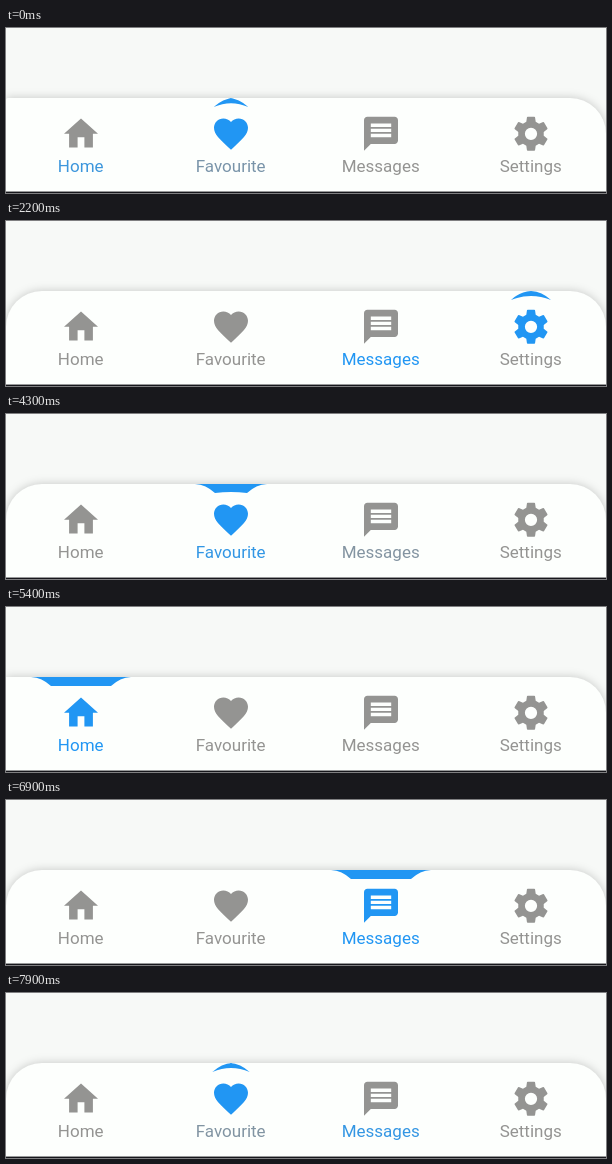
An HTML page that plays this animation: 600x165 px, repeating every 8000 ms.

```html
<!DOCTYPE html>
<html lang="en">
<head>
<meta charset="utf-8">
<title>Bottom navigation</title>
<style>
  html, body { margin: 0; width: 100%; height: 100%; overflow: hidden; background: #f7f9f7; }
  svg { display: block; width: 600px; height: 165px; }
  text { font: 400 17px Roboto, sans-serif; text-anchor: middle; }
  #bar { fill: #fdfffd; filter: drop-shadow(0 0 5px rgba(0, 0, 0, .2)); }
  #notch { fill: #2196f3; }
</style>
</head>
<body>
<svg viewBox="0 0 600 165">
  <path id="bar"/>
  <path id="notch"/>
  <g id="tabs"></g>
  <rect y="163.6" width="600" height="1.4" fill="#17171c"/>
</svg>
<script>
const LOOP = 8000, STEP = 100, DURATION = 480;
const TOP = 70, RADIUS = 36, HALF = 50, SIDE = 20, DEPTH = 9;
const GREY = [148, 148, 146], BLUE = [33, 150, 243];

// [start time, selected tab]
const TAPS = [[-20, 1], [600, 2], [2200, 3], [3100, 2], [4000, 1], [4900, 0],
              [5700, 1], [6300, 2], [7100, 3], [7500, 2], [7890, 1]];

// Icons use a 24 unit box
const TABS = [
  ['Home', 'M10 20v-6h4v6h5v-8h3L12 3 2 12h3v8z'],
  ['Favourite', 'M12 21.35l-1.45-1.32C5.4 15.36 2 12.28 2 8.5 2 5.42 4.42 3 7.5 3c1.74 0 3.41.81 4.5 2.09C13.09 3.81 14.76 3 16.5 3 19.58 3 22 5.42 22 8.5c0 3.78-3.4 6.86-8.55 11.54z'],
  ['Messages', 'M20 2H4c-1.1 0-2 .9-2 2v18l4-4h14c1.1 0 2-.9 2-2V4c0-1.1-.9-2-2-2zM18 14H6v-2h12zM18 11H6V9h12zM18 8H6V6h12z'],
  ['Settings', gear()]
];

function gear() {
  let d = '';
  for (let i = 0; i < 6; i++) {
    const a = i * Math.PI / 3, c = Math.cos(a), s = Math.sin(a);
    const at = (x, y) => `${(12 + x * c - y * s).toFixed(2)} ${(12 + x * s + y * c).toFixed(2)} `;
    d += (i ? 'L' : 'M') + at(-2.76, -7.05) + 'L' + at(-2.4, -9.6) + 'Q' + at(-2.35, -10) + at(-1.92, -10) +
         'L' + at(1.92, -10) + 'Q' + at(2.35, -10) + at(2.4, -9.6) + 'L' + at(2.76, -7.05);
  }
  return d + 'zM8.4 12a3.6 3.6 0 1 0 7.2 0a3.6 3.6 0 1 0-7.2 0z';
}

const $ = id => document.getElementById(id);
const centre = i => 75 + 150 * i;
const mix = k => `rgb(${GREY.map((g, i) => Math.round(g + (BLUE[i] - g) * k))})`;

$('tabs').innerHTML = TABS.map(([name, d], i) =>
  `<path d="${d}" fill-rule="evenodd" transform="translate(${centre(i)} 105.8) scale(1.7) translate(-12 -12)"/>` +
  `<text x="${centre(i) - .3}" y="144">${name}</text>`).join('');
const icons = [...$('tabs').querySelectorAll('path')];
const labels = [...$('tabs').querySelectorAll('text')];

function barPath(left, right) {
  return `M0 163.6V${TOP + left}Q0 ${TOP} ${left} ${TOP}H${600 - right}Q600 ${TOP} 600 ${TOP + right}V163.6z`
    .replace(/Q0 (\S+) (\S+) (\S+)H/, `A${left} ${left} 0 0 1 $2 $3H`)
    .replace(/Q600 (\S+) (\S+) (\S+)V/, `A${right} ${right} 0 0 1 $2 $3V`);
}

// The sides keep their shape and slide apart; they start out crossed.
function notchPath(c, p) {
  const w = HALF * p, b = w - SIDE, k = w - 11;
  const low = TOP + DEPTH, arch = low - 8 * (1 - p);
  return `M${c - w} ${TOP}Q${c - k} ${TOP + .7} ${c - b} ${low}` +
    `Q${c} ${arch} ${c + b} ${low}Q${c + k} ${TOP + .7} ${c + w} ${TOP}z`;
}

function draw(time) {
  const t = Math.floor(time % LOOP / STEP) * STEP;
  let n = 0;
  while (n + 1 < TAPS.length && TAPS[n + 1][0] <= t) n++;
  const [start, now] = TAPS[n], before = n ? TAPS[n - 1][1] : 0;
  const x = Math.min(1, (t - start) / DURATION);
  const p = 1 - (1 - x) ** 1.3, tint = Math.sqrt(p);
  const level = (i, k) => i === now ? k : i === before ? 1 - k : 0;

  $('bar').setAttribute('d', barPath(RADIUS * (1 - level(0, p)), RADIUS * (1 - level(3, p))));
  $('notch').setAttribute('d', notchPath(centre(now), p));
  icons.forEach((icon, i) => icon.setAttribute('fill', mix(i === now ? 1 : 0)));
  labels.forEach((label, i) => label.setAttribute('fill', mix(level(i, tint))));
}

const begin = performance.now();
function tick() {
  draw(performance.now() - begin);
  requestAnimationFrame(tick);
}
tick();
</script>
</body>
</html>
```
